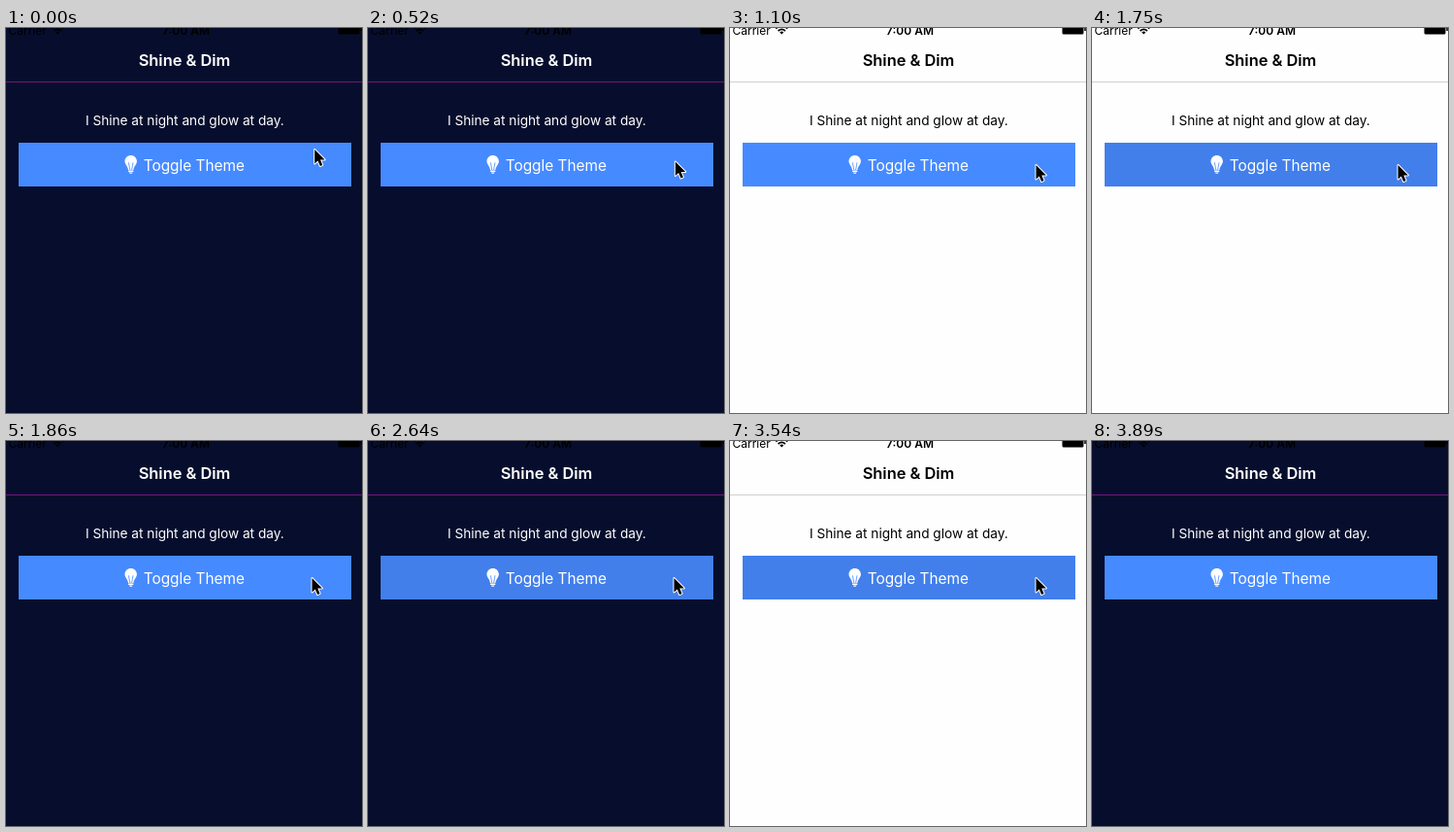
These frames come from a looping animation (367x396 px, 4.54 s). An HTML page:

```html
<!DOCTYPE html>
<html lang="en">
<head>
<meta charset="utf-8">
<title>Theme toggle</title>
<style>
  html, body { margin: 0; height: 100%; overflow: hidden; }
  svg {
    display: block; width: 367px; height: 396px;
    font-family: Inter, "Open Sans", sans-serif;
    --bg: #070e2d; --ink: #fff; --line: #74157f;
  }
  svg.light { --bg: #fefefe; --ink: #000; --line: #cfcfcf; }
  .bg { fill: var(--bg); }
  .line { fill: var(--line); }
  .ink { fill: var(--ink); }
  #button { fill: #468aff; }
  .pressed #button { fill: #427feb; }
  .filament { fill: none; stroke: #468aff; stroke-width: .8; }
  .mid { text-anchor: middle; }
</style>
</head>
<body>
<svg id="stage" viewBox="0 0 367 396">
  <rect class="bg" width="367" height="396"/>

  <!-- status bar -->
  <g font-size="12">
    <text x="2.5" y="6.5">Carrier</text>
    <text class="mid" x="185.5" y="6.5" font-weight="600">7:00 AM</text>
    <path d="M47.3 .6Q53.3 -4.6 59.3 .6M49.6 3Q53.3 -.2 57 3"
          fill="none" stroke="#000" stroke-width="1.7"/>
    <path d="M51.3 4.4Q53.3 2.8 55.3 4.4L53.3 6.4Z"/>
    <rect x="342.5" y="-5" width="22" height="11.5" rx="1.5"/>
    <rect x="365.3" y="-2" width="1.5" height="5"/>
  </g>

  <text class="ink mid" x="184" y="39.3" font-size="16.4" font-weight="600">Shine &amp; Dim</text>
  <rect class="line" y="55" width="367" height="1"/>
  <text class="ink mid" x="184.3" y="100" font-size="13.65">I Shine at night and glow at day.</text>

  <rect id="button" x="13" y="118" width="343" height="45"/>
  <g fill="#fff">
    <path d="M128.7 131C125.2 131 122.5 133.7 122.5 137.1C122.5 140.7 125.4 141.8 126 146H131.4C132 141.8 134.9 140.7 134.9 137.1C134.9 133.7 132.2 131 128.7 131Z"/>
    <path d="M126.1 146.6H131.3V148H126.1ZM126.8 148.5H130.6L129.8 149.8H127.6Z"/>
    <path class="filament" d="M126.4 138.3L127.8 146M131 138.3L129.6 146"/>
    <text x="141.7" y="146.5" font-size="15.4">Toggle Theme</text>
  </g>

  <path id="cursor" d="M0 0V14.5L3.3 11.4L5.7 17L8.1 15.9L5.8 10.5H10.4Z"
        stroke="#fff" stroke-width="2" stroke-linejoin="round" paint-order="stroke"/>
</svg>
<script>
const LOOP = 4540, STEP = 56, RELEASE = 60, EXIT = 3890;
const stage = document.getElementById("stage");
const cursor = document.getElementById("cursor");

// each tap: button down, theme flips; the button is let go shortly after
const taps = [[930, 980], [1750, 1800], [2640, 2760], [3540, 3600]];

// progress from 0 to 1 in equal steps, the first one at the start time
const glide = (t, start, steps) =>
  Math.min(Math.max(Math.floor((t - start) / STEP) + 1, 0), steps) / steps;

function draw(t) {
  const flips = taps.filter(([, flip]) => t >= flip).length;
  stage.classList.toggle("light", flips % 2 === 1);
  stage.classList.toggle("pressed", taps.some(([down, flip]) => t >= down && t < flip + RELEASE));

  // drift down, settle on the button, then leave to the lower right
  const drift = glide(t, 110, 5), settle = glide(t, 520, 2), leave = glide(t, 3830, 1);
  const x = 318.2 - 2.7 * settle + 22.5 * leave;
  const y = 125 + 9 * drift + 7 * settle + 9 * leave;
  cursor.setAttribute("transform", `translate(${x} ${y})`);
  cursor.setAttribute("visibility", t < EXIT ? "visible" : "hidden");
}

const start = performance.now();
function tick() {
  draw((performance.now() - start) % LOOP);
  requestAnimationFrame(tick);
}
tick();
</script>
</body>
</html>
```
